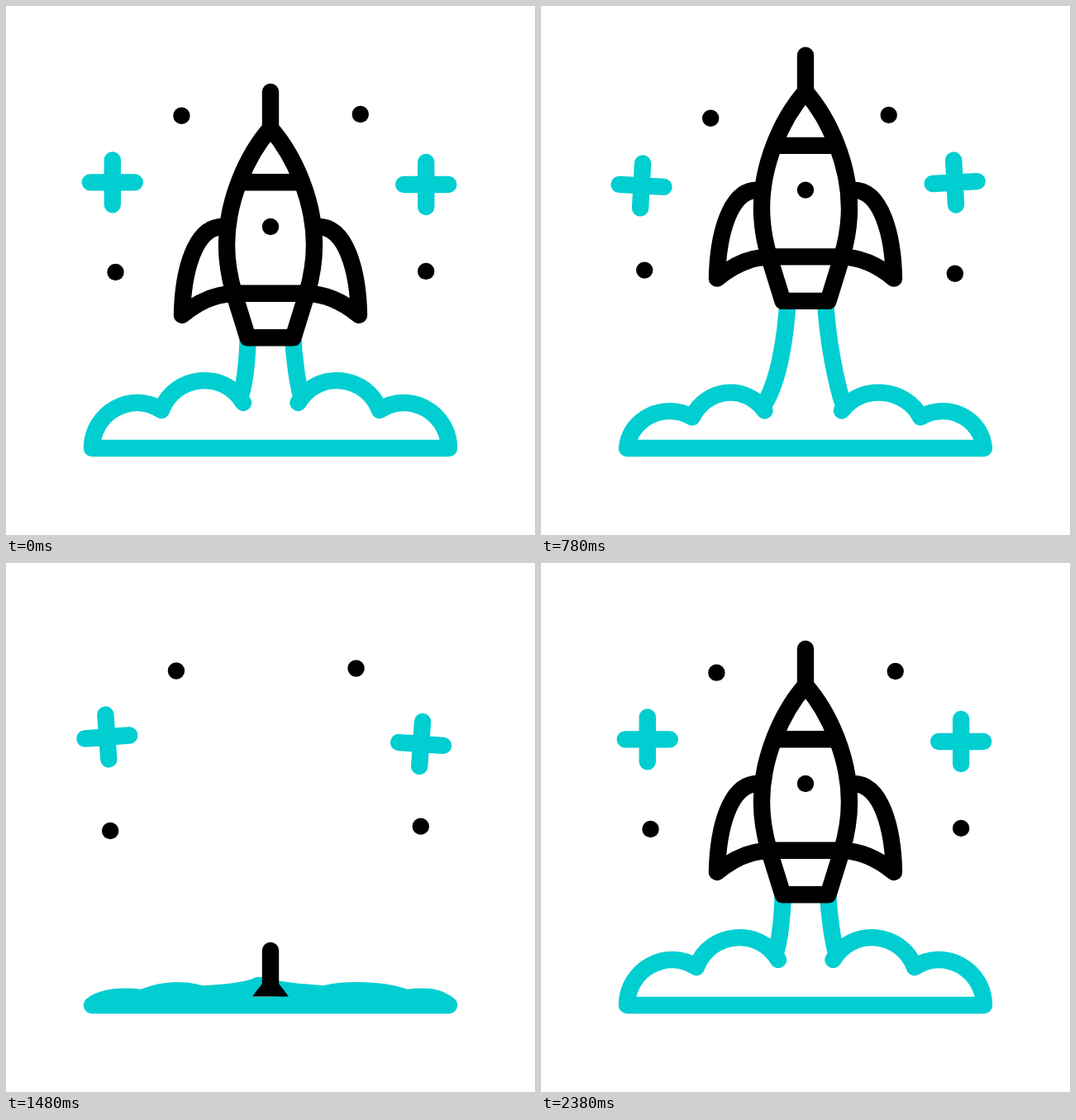
Write an HTML page that moves like this. It is 640x640 px and loops after 2.4 s.

```html
<!DOCTYPE html>
<html lang="en">
<head>
<meta charset="utf-8">
<title>Rocket launch</title>
<style>
  html, body { margin: 0; width: 100%; height: 100%; overflow: hidden; background: #fff; }
  svg { display: block; width: 100vw; height: 100vh; }
  .line { stroke-width: 20.4; stroke-linecap: round; stroke-linejoin: round; }
  .teal { stroke: #00ced1; fill: none; }
  .black { stroke: #000; fill: #fff; }
</style>
</head>
<body>
<svg viewBox="0 0 640 640">
  <defs><clipPath id="sky"><rect width="640" height="524.6"/></clipPath></defs>
  <g id="stars"></g>
  <path id="smoke" class="line teal"/>
  <g clip-path="url(#sky)">
    <g id="rocket" class="line black">
      <path d="M262 267C228 267 214 322 213 374C231 359 252 348 277 348"/>
      <path d="M378 267C412 267 426 322 427 374C409 359 388 348 363 348"/>
      <path d="M320 148C291 181 267 236 267 289C267 310 271 331 276 348L292.5 401.3H347.5L364 348C369 331 373 310 373 289C373 236 349 181 320 148Z"/>
      <path d="M320 104V148M277 347.8H363"/>
      <path d="M284 213.3H356" stroke-linecap="butt"/>
      <circle cx="320" cy="267" r="10.2" fill="#000" stroke="none"/>
    </g>
  </g>
</svg>
<script>
const LOOP = 2400;
const $ = id => document.getElementById(id);
const ramp = (t, from, to) => Math.min(1, Math.max(0, (t - from) / (to - from)));
const ease = (t, from, to) => {
  const u = ramp(t, from, to);
  return u * u * (3 - 2 * u);
};
const mix = (a, b, k) => a + (b - a) * k;
const rad = deg => deg * Math.PI / 180;

// Each star circles its centre; ry sets the height and direction, tilt the swing of a plus.
const stars = [
  { x: 124.7, y: 214.3, ry: 4.6, phase: -12, tilt: 4.9 },
  { x: 504, y: 215.7, ry: -3.7, phase: -5, tilt: -4.7 },
  { x: 208.3, y: 133.4, ry: 3.5, phase: -12 },
  { x: 424.6, y: 130.6, ry: 3.2, phase: 8 },
  { x: 128.4, y: 321.5, ry: -2.9, phase: -10 },
  { x: 504, y: 321.5, ry: 3.4, phase: -10 }
];
for (const s of stars) {
  s.el = document.createElementNS("http://www.w3.org/2000/svg", "path");
  s.el.setAttribute("class", "line");
  s.el.setAttribute("d", s.tilt ? "M-27 0H27M0-27V27" : "M0 0h.01");
  s.el.setAttribute("stroke", s.tilt ? "#00ced1" : "#000");
  $("stars").append(s.el);
}

function drawStars(t) {
  const u = ramp(t, 0, 2380);
  const lead = 30 * Math.sin(Math.PI * u) + 6 * Math.sin(2 * Math.PI * u);
  for (const s of stars) {
    const a = rad(360 * u + lead + s.phase);
    const x = s.x + 4.2 * Math.cos(a), y = s.y + s.ry * Math.sin(a);
    const r = (s.tilt || 0) * Math.sin(rad(360 * u + 0.7 * lead));
    s.el.setAttribute("transform", `translate(${x} ${y}) rotate(${r})`);
  }
}

// One half of the cloud: an outer and an inner puff, both flattened by k.
function puffs(x, dir, valleyX, innerX, k) {
  const valleyY = mix(489, 528, k), innerY = mix(480, 524, k);
  const handle = (px, py, dx, dy, flatX, flatY) =>
    `${px + dir * mix(dx, flatX, k)} ${py + mix(dy, flatY, k)}`;
  return `M${x} 535C${handle(x, 535, 0, -43, 14, -9)} ${handle(valleyX, valleyY, -36, -24, -25, -2)} ${valleyX} ${valleyY}`
    + `C${handle(valleyX, valleyY, 16, -43, 23, -8)} ${handle(innerX, innerY, -23, -40, -23, -6)} ${innerX} ${innerY}`;
}

function trail(x, y, endX, endY, bend) {
  const at = (u, v) => `${mix(x, endX, u)} ${mix(y, endY, v)}`;
  return `M${x} ${y}C${at(0.1, 0.4)} ${at(bend, 0.8)} ${endX} ${endY}`;
}

function drawSmoke(t) {
  const settle = 1 - ease(t, 1400, 2000);
  const flat = ease(t, 516, 1400) * settle;
  const pull = ramp(t, 540, 1300) * settle;
  const rise = ease(t, 540, 1160), drop = ease(t, 1160, 1480), back = ease(t, 1480, 2040);

  const left = 287 - 52 * pull, right = 353.5 + 33 * pull;
  const sway = 2 * Math.sin(Math.PI * ramp(t, 0, 780)) ** 2;
  const topY = 396 - 135 * rise + 250 * drop - 115 * back;
  const topL = 293 + sway + 18 * rise - 6 * drop - 12 * back;
  const topR = 347 + sway - 29 * rise * rise - 8 * drop + 37 * back;
  const gap = 1 - pull, endY = mix(480, 524, flat) - 6 * gap;

  $("smoke").setAttribute("d", "M104 535H536"
    + puffs(104, 1, mix(188, 164, flat), left, flat)
    + puffs(536, -1, mix(452, 485, flat), right, flat)
    + trail(topL, topY, left - 4 * gap, endY, 0.4)
    + trail(topR, topY, right + 4 * gap, endY, 0.6));
}

function rocketY(t) {
  if (t < 1200) return -44 * (Math.max(0, t - 340) / 440) ** 3.8;
  return 452 * (1 - ease(t, 1200, 2200));
}

function draw(t) {
  drawStars(t);
  drawSmoke(t);
  $("rocket").setAttribute("transform", `translate(0 ${rocketY(t)})`);
}

const start = performance.now();
function tick(now) {
  draw(Math.max(0, now - start) % LOOP);
  requestAnimationFrame(tick);
}
draw(0);
requestAnimationFrame(tick);
</script>
</body>
</html>
```
